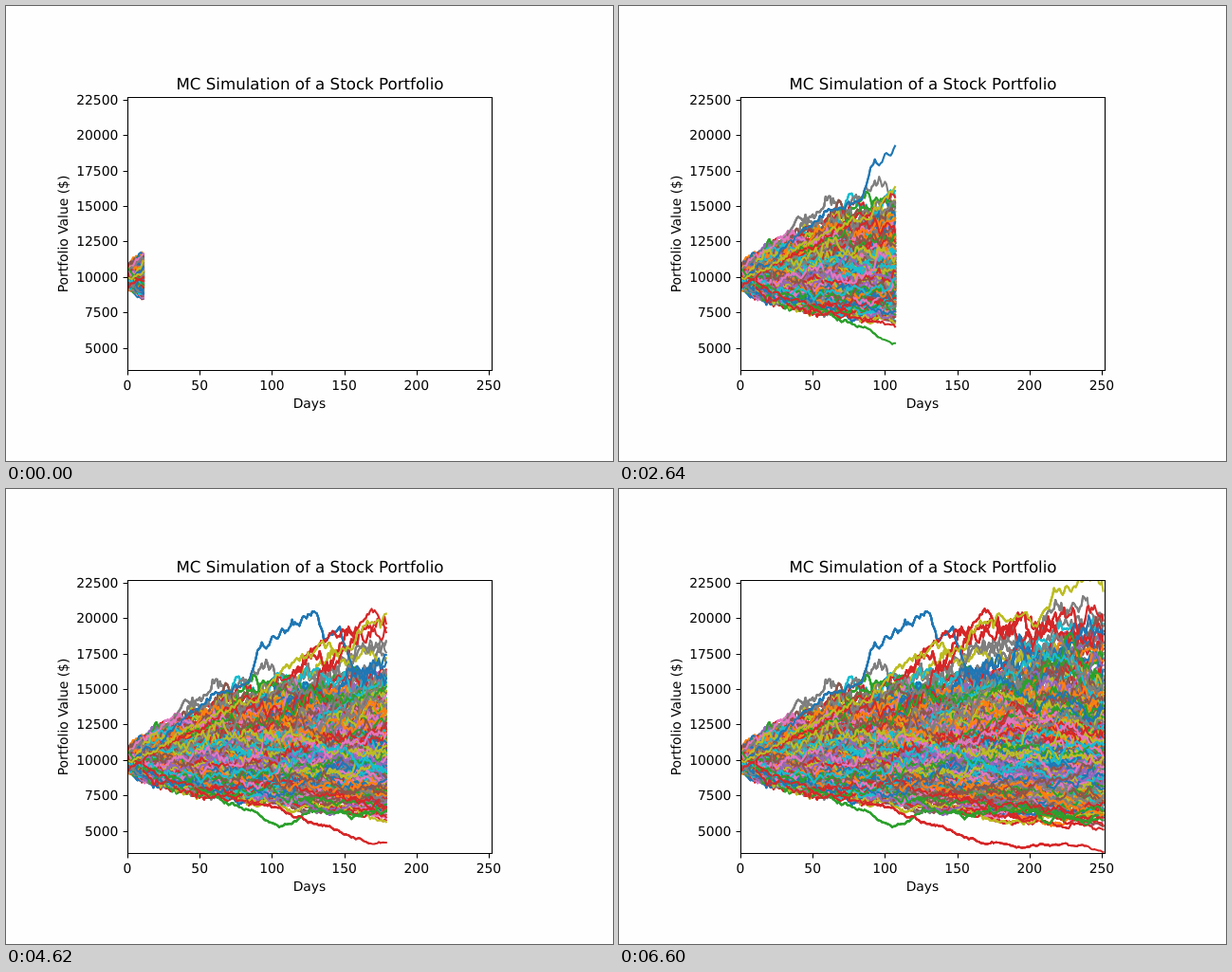
These frames come from a looping animation (640x480 px, 6.93 s). An HTML page with a canvas:

```html
<!DOCTYPE html>
<html lang="en">
<head>
<meta charset="utf-8">
<title>MC Simulation of a Stock Portfolio</title>
<style>
  html, body { margin: 0; width: 640px; height: 480px; overflow: hidden; background: #fefefe; }
  canvas, svg { position: absolute; left: 0; top: 0; }
  text { font: 13.89px "DejaVu Sans", sans-serif; text-rendering: geometricPrecision; }
  .mid { text-anchor: middle; }
  .end { text-anchor: end; }
  .title { font-size: 16.67px; }
  path { fill: none; stroke: #000; stroke-width: 1.1; }
</style>
</head>
<body>
<canvas id="plot" width="640" height="480"></canvas>
<svg id="axes" width="640" height="480"></svg>
<script>
const STEP = 330, STEPS = 21, DAYS_PER_STEP = 12, LAST_DAY = 251;
const COLORS = ['#1f77b4', '#ff7f0e', '#2ca02c', '#d62728', '#9467bd',
                '#8c564b', '#e377c2', '#7f7f7f', '#bcbd22', '#17becf'];
const px = day => 128 + day * 384 / 252;
const py = value => 285.85 - (value - 10000) * 0.01496;

// Fan that the walks stay inside, in dollars.
const ceiling = day => 10900 + 395 * day ** 0.6;
const floor = day => 9100 - 170 * day ** 0.58;

let seed = 20;
const random = () => (seed = (seed * 1664525 + 1013904223) % 4294967296) / 4294967296;
const gauss = () => (random() + random() + random() + random() - 2) * 1.73;

// Random walk in log value; a Brownian bridge pulls it through
// the key points, given as day and value in hundreds of dollars.
function makeWalk(color, ...keys) {
  const values = [];
  let log = 0.033 * gauss();
  for (let day = 0; day <= LAST_DAY; day++) {
    const value = 10000 * Math.exp(log);
    values.push(value);
    while (keys.length && keys[0] <= day) keys.splice(0, 2);
    if (keys.length) {
      const left = keys[0] - day;
      log += (Math.log(keys[1] / 100) - log) / left
           + 0.01 * gauss() * Math.sqrt(1 - 1 / left);
    } else {
      let move = 0.0165 * gauss();
      if (value > ceiling(day)) move = -Math.abs(move);
      if (value < floor(day)) move = Math.abs(move);
      log += move + 0.0001;
    }
  }
  return { color: COLORS[color], values };
}

const walks = Array.from({ length: 500 }, (_, i) => makeWalk(i % 10));
walks.push(
  makeWalk(0, 65, 148, 85, 158, 90, 177, 114, 199, 130, 204, 136, 184, 147, 194, 165, 155),
  makeWalk(2, 93, 60, 114, 55, 127, 65),
  makeWalk(3, 131, 180, 187, 194),
  makeWalk(3, 118, 60, 160, 45, 203, 40, 251, 35),
  makeWalk(8, 200, 200, 250, 226)
);

const ctx = document.getElementById('plot').getContext('2d');
ctx.beginPath();
ctx.rect(128, 96, 385, 289);
ctx.clip();
ctx.lineWidth = 2.08;
ctx.lineCap = 'square';
ctx.lineJoin = 'round';

// Each step extends the walks and strokes their recent days again.
function drawStep(step) {
  const to = step * DAYS_PER_STEP + DAYS_PER_STEP - 1;
  const from = Math.max(0, to - 4 * DAYS_PER_STEP);
  for (const { color, values } of walks) {
    ctx.strokeStyle = color;
    ctx.beginPath();
    for (let day = from; day <= to; day++) ctx.lineTo(px(day), py(values[day]));
    ctx.stroke();
  }
}

function drawAxes() {
  let lines = 'M128.5 96.5H512.5V384.5H128.5Z';
  let labels = '';
  const text = (x, y, cls, s) => labels += `<text x="${x}" y="${y}" class="${cls}">${s}</text>`;
  for (let day = 0; day <= 250; day += 50) {
    lines += `M${Math.round(px(day)) + 0.5} 385v4.4`;
    text(px(day), 405, 'mid', day);
  }
  for (let value = 5000; value <= 22500; value += 2500) {
    const y = Math.round(py(value));
    lines += `M128 ${y + 0.5}h-4.4`;
    text(118.3, y + 5, 'end', value);
  }
  text(320, 424, 'mid', 'Days');
  text(320.5, 88, 'mid title', 'MC Simulation of a Stock Portfolio');
  labels += '<text class="mid" transform="translate(65 240.5) rotate(-90)">Portfolio Value ($)</text>';
  document.getElementById('axes').innerHTML = `<path d="${lines}"/>${labels}`;
}

let shown = -1;
function tick() {
  const step = Math.floor(performance.now() / STEP) % STEPS;
  if (step < shown) {
    ctx.clearRect(0, 0, 640, 480);
    shown = -1;
  }
  while (shown < step) drawStep(++shown);
  requestAnimationFrame(tick);
}
drawAxes();
tick();
</script>
</body>
</html>
```
